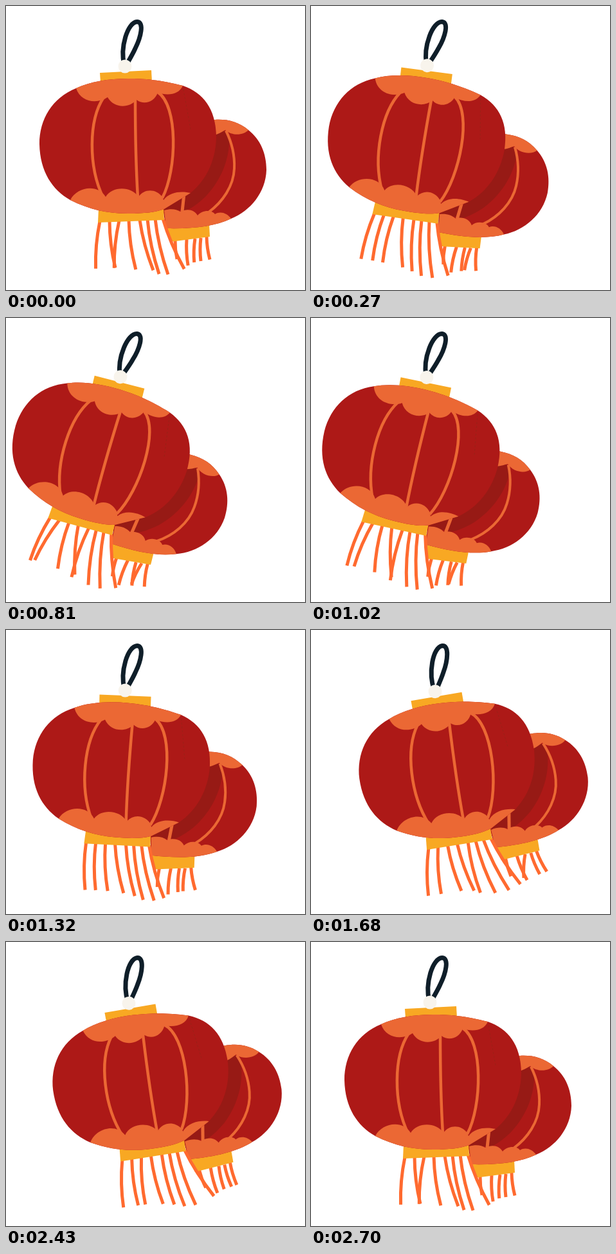
Animation of 465 by 442 pixels, one loop 2.73 s. Source, as an HTML page with a canvas:

```html
<!DOCTYPE html>
<html lang="en">
<head>
<meta charset="utf-8">
<title>Swinging lanterns</title>
<style>
  html, body { margin: 0; width: 100%; height: 100%; overflow: hidden; background: #fff; }
  canvas { display: block; width: 465px; height: 442px; }
</style>
</head>
<body>
<canvas id="stage"></canvas>
<script>
const W = 465, H = 442, LOOP = 2730, PERIOD = 2700, STEP = 30;
const RED = '#ad1917', SHADE = '#971a15', ORANGE = '#eb6834', GOLD = '#f8a823',
      FRINGE = '#ff6a2f', INK = '#0f1e29', PEARL = '#f8f4ec';
const RAD = Math.PI / 180;

const canvas = document.getElementById('stage');
const scale = window.devicePixelRatio || 1;
canvas.width = W * scale;
canvas.height = H * scale;
const ctx = canvas.getContext('2d');

// Swing angles in degrees, clockwise positive.
const swingTimes = [0, 270, 540, 720, 1020, 1320, 1680, 1980, 2160, 2430];
const lanternSwing = [0, 10.4, 17, 17.7, 14.5, 5.2, -6.8, -9.8, -9.5, -6.8];
const stringSwing = [0, 3.6, 5.7, 6, 4.2, -0.2, -6.4, -8, -7.6, -4.8];

// Fringe strands: root x, root y, length, lean at each of leanTimes.
const leanTimes = [0, 540, 1020, 1320, 1680, 2160];
const frontFringe = [
  [146, 335, 74, [-5, -7, -6, 4, -7, -6]],
  [161, 334, 74, [7, -15, -9, 5, -3, -7]],
  [176, 334, 74, [-6, 2, 5, 8, 10, 4]],
  [191, 333, 78, [8, 12, 14, 15, 13, 8]],
  [208, 333, 81, [15, 0, 1, 15, 7, -1]],
  [220, 332, 87, [12, 8, 11, 15, 14, 7]],
  [232, 331, 89, [13, 14, 14, 18, 20, 13]],
  [244, 331, 85, [23, 22, 22, 21, 26, 28]]
];
const backFringe = [
  [263, 365, 29, [6, 6, 3, -1, 10, 20]],
  [281, 363, 41, [3, -5, -1, -1, 16, 13]],
  [294, 362, 37, [-2, 7, 6, 2, -10, 12]],
  [303, 361, 36, [0, -8, -7, 0, 16, 20]],
  [312, 359, 36, [8, 10, 10, 16, 20, 13]]
];

const pivot = [204, 23], bead = [185, 94];

const shapes = {
  backCap: 'M249 346L316 340L317 359L256 367Z',
  backBody: 'M300 177L325 177C345 176 361 180 377 193C396 208 405 230 405 255' +
    'C404 290 380 319 350 331C325 343 290 347 249 346L244 316Z',
  backShade: 'M320 180L338 193C345 198 348 207 347 215C345 245 332 274 310 297C299 307 290 314 281 318L246 318Z',
  backTop: 'M300 177L325 177C345 176 361 180 377 193C370 201 352 203 341 193C335 196 330 200 320 202Z',
  backBottom: 'M246 318C256 315 265 316 271 320C282 315 293 317 298 326C305 317 320 317 325 324' +
    'C333 319 344 322 350 331C325 343 290 347 249 346Z',
  backRib: 'M342 194C352 214 356 232 355 253C354 280 337 305 315 321',
  innerRib: 'M277 292L274 320',
  topCap: 'M146 104L226 100L227 118L147 119Z',
  bottomCap: 'M144 315L143 337L246 333L245 313Z',
  body: 'M109 128C72 143 52 176 52 215C53 258 72 286 100 302C130 317 158 323 190 323' +
    'C215 323 232 321 246 316L287 291C314 269 327 236 327 202C326 160 307 135 275 124' +
    'C240 115 215 113 190 113C160 113 130 118 109 128Z',
  top: 'M109 128C130 118 160 113 190 113C215 113 240 115 275 124C269 138 252 140 236 135' +
    'C231 149 215 155 203 146C192 159 168 160 158 142C142 153 116 150 109 128Z',
  bottom: 'M100 302C110 282 142 276 155 297C165 280 195 280 206 297C215 284 233 284 243 297' +
    'L245 302C255 288 275 288 287 291L246 316C232 321 215 323 190 323C158 323 130 317 100 302Z',
  ribLeft: 'M152 142C128 178 128 250 151 298',
  ribMiddle: 'M201 143C201 200 202 250 205 298',
  ribRight: 'M236 134C268 155 266 255 243 299',
  seam: 'M276 130L287 192',
  string: 'M184 92C177 65 189 25 204 24.5C215 25 210 48 201 66C197 75 191 85 187 92'
};
for (const name in shapes) shapes[name] = new Path2D(shapes[name]);

// Periodic cubic Hermite curve through the given points.
function curve(t, times, values) {
  const n = times.length;
  const time = i => times[(i + n) % n] + Math.floor(i / n) * PERIOD;
  const value = i => values[(i + n) % n];
  const slope = i => {
    const a = time(i) - time(i - 1), b = time(i + 1) - time(i);
    return ((value(i) - value(i - 1)) / a * b + (value(i + 1) - value(i)) / b * a) / (a + b);
  };
  let i = n - 1;
  while (times[i] > t) i--;
  const h = time(i + 1) - time(i), u = (t - time(i)) / h, v = 1 - u;
  return value(i) * (1 + 2 * u) * v * v + slope(i) * h * u * v * v +
    value(i + 1) * u * u * (3 - 2 * u) - slope(i + 1) * h * u * u * v;
}

function fill(name, color) {
  ctx.fillStyle = color;
  ctx.fill(shapes[name]);
}

function stroke(path, color, width) {
  ctx.strokeStyle = color;
  ctx.lineWidth = width;
  ctx.stroke(path);
}

function drawFringe(strands, t) {
  for (const [x, y, length, leans] of strands) {
    const lean = curve(t, leanTimes, leans) * RAD;
    const dx = Math.sin(lean) * length, dy = Math.cos(lean) * length;
    const strand = new Path2D();
    strand.moveTo(x, y);
    strand.quadraticCurveTo(x + dx / 2 - length * 0.06, y + dy / 2, x + dx, y + dy);
    stroke(strand, FRINGE, 5);
  }
}

function drawBackLantern(t) {
  drawFringe(backFringe, t);
  fill('backCap', GOLD);
  fill('backBody', RED);
  fill('backShade', SHADE);
  fill('backTop', ORANGE);
  fill('backBottom', ORANGE);
  stroke(shapes.backRib, ORANGE, 4);
  stroke(shapes.innerRib, ORANGE, 5);
}

function drawFrontLantern(t) {
  drawFringe(frontFringe, t);
  fill('bottomCap', GOLD);
  fill('topCap', GOLD);
  fill('body', RED);
  stroke(shapes.ribLeft, ORANGE, 4.5);
  stroke(shapes.ribMiddle, ORANGE, 4.5);
  stroke(shapes.ribRight, ORANGE, 4.5);
  fill('top', ORANGE);
  fill('bottom', ORANGE);
  ctx.setLineDash([3, 3]);
  stroke(shapes.seam, 'rgba(120, 50, 25, 0.6)', 0.6);
  ctx.setLineDash([]);
}

function rotateAbout([x, y], degrees) {
  ctx.translate(x, y);
  ctx.rotate(degrees * RAD);
  ctx.translate(-x, -y);
}

function draw(t) {
  const stringAngle = curve(t, swingTimes, stringSwing);
  const lanternAngle = curve(t, swingTimes, lanternSwing);
  ctx.setTransform(scale, 0, 0, scale, 0, 0);
  ctx.fillStyle = '#fff';
  ctx.fillRect(0, 0, W, H);
  rotateAbout(pivot, stringAngle);

  ctx.save();
  rotateAbout(bead, lanternAngle - stringAngle);
  drawBackLantern(t);
  drawFrontLantern(t);
  ctx.restore();

  stroke(shapes.string, INK, 7);
  ctx.fillStyle = PEARL;
  ctx.beginPath();
  ctx.arc(bead[0], bead[1], 10.5, 0, Math.PI * 2);
  ctx.fill();
}

const start = performance.now();
function tick() {
  const elapsed = (performance.now() - start) % LOOP;
  draw(Math.floor(elapsed / STEP) * STEP % PERIOD);
  requestAnimationFrame(tick);
}
tick();
</script>
</body>
</html>
```
